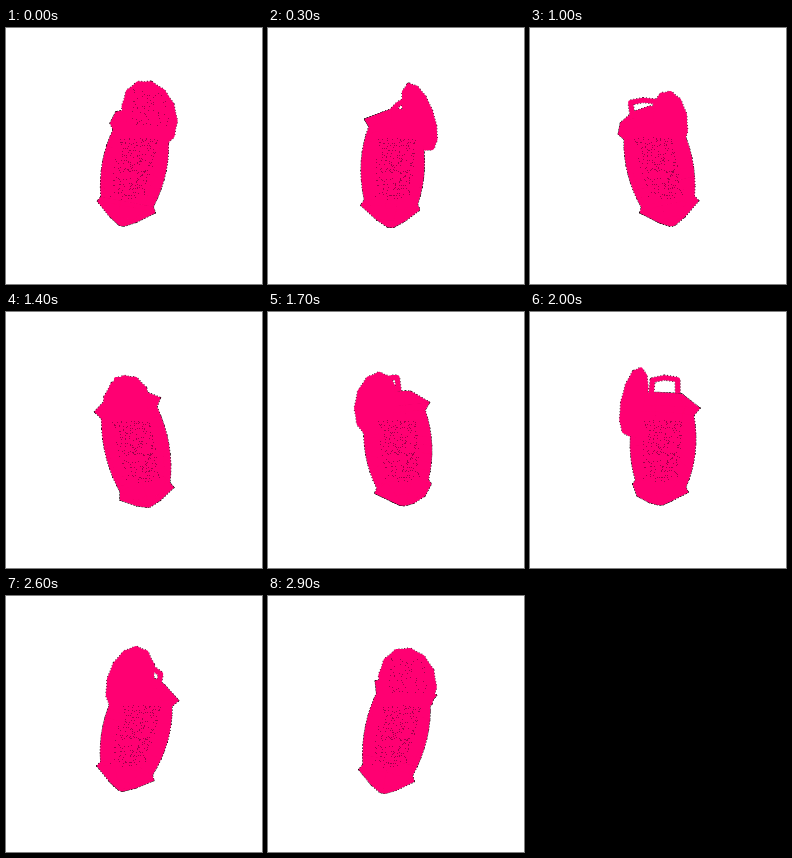
An HTML page with a canvas for the animation above (3 s loop, 256x256 px).

```html
<!DOCTYPE html>
<html lang="en">
<head>
<meta charset="utf-8">
<title>Turning lantern</title>
<style>
  html, body { margin: 0; width: 100%; height: 100%; overflow: hidden; background: #fff; }
  canvas { display: block; width: 100vw; height: 100vh; image-rendering: pixelated; }
</style>
</head>
<body>
<canvas id="stage" width="256" height="256"></canvas>
<script>
const ctx = document.getElementById('stage').getContext('2d');
const LOOP = 3000, STEP = 100;
const PINK = '#ff0072', DARK = '#1c000d', SPECK = '#a0004a';
const CENTRE = { x: 129, y: 140 }, DISTANCE = 210;
const LEAN = rad(14), LEAN_HEADING = 140;
const SIDES = 6;

function rad(degrees) { return degrees * Math.PI / 180; }
const range = (n, make) => Array.from({ length: n }, (_, i) => make(i));

// Spins a point about the upright axis; y runs down, the camera is level
function project(px, py, h, turn) {
  const a = rad(turn), near = -(px * Math.sin(a) + py * Math.cos(a));
  const scale = DISTANCE / (DISTANCE - near);
  return [
    CENTRE.x + (px * Math.cos(a) - py * Math.sin(a)) * scale,
    CENTRE.y + h * scale
  ];
}

// Body space: h along the leaning axis, its foot pointing to LEAN_HEADING
function bodyPoint(x, y, h, turn) {
  const cos = Math.cos(LEAN), sin = Math.sin(LEAN);
  return project(x * cos + h * sin + 1, y - 2.5, h * cos - x * sin, turn - LEAN_HEADING);
}

const barrelRadius = h => 33.5 - 0.004 * (h + 6) ** 2;

// Rings of the body from roof to foot: [height, radius]
const rings = [
  [-57, 17], [-45, 34.5],
  ...range(9, i => -38 + i * 9).map(h => [h, barrelRadius(h)]),
  [39, 30], [51, 14], [57, 3]
];

function polygon(points) {
  const path = new Path2D();
  points.forEach(p => path.lineTo(...p));
  path.closePath();
  return path;
}

function bodyPaths(turn) {
  const loops = rings.map(([h, r]) => range(SIDES, i => {
    const a = rad(5 + i * 360 / SIDES);
    return bodyPoint(r * Math.cos(a), r * Math.sin(a), h, turn);
  }));
  const paths = loops.map(polygon);
  for (let k = 1; k < loops.length; k++) {
    for (let i = 0; i < SIDES; i++) {
      const j = (i + 1) % SIDES, up = loops[k - 1], down = loops[k];
      paths.push(polygon([up[i], up[j], down[j], down[i]]));
    }
  }
  return paths;
}

// The lid hangs beside the roof, its lower edge swung outward
function lidPoint(across, down, turn) {
  const place = rad(-55), tilt = rad(-65), plane = rad(14);
  const out = 0.24 * down;
  return project(
    24 * Math.cos(place) + out * Math.cos(tilt) + across * Math.cos(plane),
    24 * Math.sin(place) + out * Math.sin(tilt) + across * Math.sin(plane),
    down - 49, turn);
}

function lidPath(turn) {
  return polygon(range(24, i => {
    const a = rad(10 + i * 15), r = i % 2 ? 0.95 : 1;
    return lidPoint(24 * r * Math.sin(a), -31 * r * Math.cos(a), turn);
  }));
}

function handlePath(turn) {
  const path = new Path2D();
  const heading = rad(45);
  for (const [u, h] of [[-15, -57], [-14, -69], [0, -71], [14, -69], [15, -57]]) {
    path.lineTo(...bodyPoint(u * Math.cos(heading), u * Math.sin(heading), h, turn));
  }
  return path;
}

function randomizer(seed) {
  return () => (seed = seed * 16807 % 2147483647) / 2147483647;
}

function specks(count, seed, width, height, place) {
  const random = randomizer(seed);
  ctx.fillStyle = SPECK;
  for (let i = 0; i < count; i++) {
    const [x, y] = place((random() * 2 - 1) * width, (random() * 2 - 1) * height);
    ctx.fillRect(Math.round(x), Math.round(y), 1, 1);
  }
}

function stroke(path, color, width, dash = []) {
  ctx.strokeStyle = color;
  ctx.lineWidth = width;
  ctx.setLineDash(dash);
  ctx.stroke(path);
}

function draw(t) {
  const turn = t / LOOP * 360;
  const body = bodyPaths(turn), lid = lidPath(turn), handle = handlePath(turn);

  ctx.fillStyle = '#fff';
  ctx.fillRect(0, 0, 256, 256);
  ctx.lineJoin = 'round';

  // Dotted rim, left visible only outside the fill
  body.forEach(p => stroke(p, DARK, 1.4, [1, 2]));
  stroke(lid, DARK, 6.2, [1, 2]);
  stroke(handle, DARK, 6.2, [1, 2]);

  stroke(handle, PINK, 5);
  stroke(lid, PINK, 5);
  ctx.fillStyle = PINK;
  [...body, lid].forEach(p => ctx.fill(p));

  const [topX, topY] = bodyPoint(0, 0, -30, turn);
  const [footX, footY] = bodyPoint(0, 0, 30, turn);
  const slant = (footX - topX) / (footY - topY);
  specks(220, 71, 19, 31, (u, v) =>
    [(topX + footX) / 2 + u + v * slant, (topY + footY) / 2 + v]);
  if (Math.cos(rad(turn)) > 0.85) {
    specks(60, 29, 17, 17, (u, v) => lidPoint(u, v - 6, turn));
  }
}

function tick() {
  draw(Math.floor(performance.now() % LOOP / STEP) * STEP);
  requestAnimationFrame(tick);
}
tick();
</script>
</body>
</html>
```
